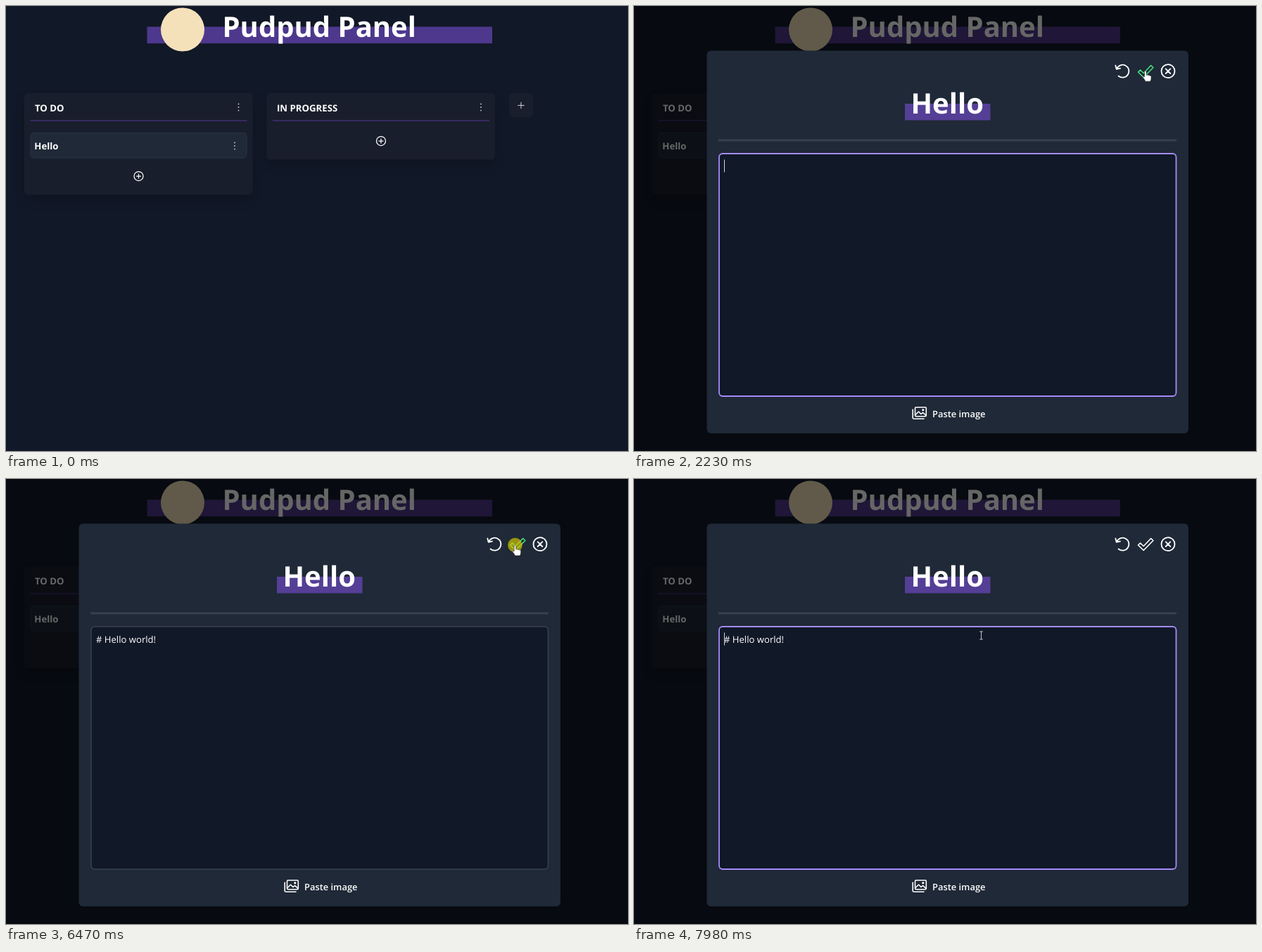
An HTML page for the animation above (8000 ms loop, 884 by 633 pixels).

```html
<!DOCTYPE html>
<html lang="en">
<head>
<meta charset="utf-8">
<title>Task board</title>
<style>
  html, body { margin: 0; width: 100%; height: 100%; overflow: hidden; background: #111827; }
  svg { display: block; width: 884px; height: 633px; }
  text { font-family: "Open Sans", "Noto Sans", sans-serif; fill: #fff; white-space: pre; text-rendering: geometricPrecision; }
  .title { font-weight: 700; font-size: 40px; }
  .head { font-weight: 700; font-size: 13.2px; }
  .paste { font-weight: 600; font-size: 12.9px; }
  .typed { font-weight: 400; font-size: 13.1px; }
  .result { font-weight: 700; font-size: 29.5px; fill: #facc15; }
  .panel { fill: #191e2c; }
  .raised { filter: drop-shadow(0 8px 7px rgba(0, 0, 0, .15)); }
  .rule { fill: #46317f; }
  .icon { fill: none; stroke: currentColor; stroke-linecap: round; stroke-linejoin: round; color: #fff; }
</style>
</head>
<body>
<svg viewBox="0 0 884 633">
  <defs>
    <g id="dots" fill="#cdd1d8">
      <circle cy="-4.6" r=".9"/><circle r=".9"/><circle cy="4.6" r=".9"/>
    </g>
    <g id="add" class="icon" stroke-width="1.25">
      <circle r="6.5"/><path d="M-3 0H3M0-3V3"/>
    </g>
  </defs>

  <rect width="884" height="633" fill="#111827"/>

  <!-- board -->
  <rect x="200.5" y="29.5" width="490.500" height="23.7" fill="#4d388d"/>
  <circle cx="251" cy="33.5" r="31" fill="#f4e1ba"/>
  <text class="title" x="307.5" y="43.5">Pudpud Panel</text>

  <g class="raised">
    <rect class="panel" x="26" y="124" width="324.5" height="144.5" rx="5"/>
    <rect class="panel" x="370.5" y="124" width="324.5" height="94.5" rx="5"/>
  </g>
  <rect class="panel" x="715" y="124" width="34" height="34" rx="5"/>
  <text class="head" x="41" y="150">TO DO</text>
  <text class="head" x="385" y="150">IN PROGRESS</text>
  <rect class="rule" x="34.5" y="162.4" width="308" height="1.3"/>
  <rect class="rule" x="379" y="162.4" width="308" height="1.3"/>
  <rect x="35" y="180.5" width="307" height="35.5" rx="4.5" fill="#1f2937" stroke="#283443"/>
  <text class="head" x="40.3" y="204">Hello</text>
  <use href="#dots" x="330.5" y="144"/>
  <use href="#dots" x="675" y="144"/>
  <use href="#dots" x="325" y="199"/>
  <use href="#add" x="188.5" y="242"/>
  <use href="#add" x="533" y="192"/>
  <path class="icon" stroke-width="1" opacity=".8" d="M727.7 141.4h8.6M732 137.100v8.600"/>

  <!-- dialog -->
  <g id="modal">
    <rect width="884" height="633" opacity=".6"/>
    <rect x="103.5" y="63.5" width="684.5" height="544.5" rx="6" fill="#1f2937"/>
    <rect x="385" y="139" width="121.5" height="23.5" fill="#553f96"/>
    <text class="title" x="393.5" y="152.5">Hello</text>
    <rect x="120" y="189.5" width="651" height="3" fill="#374151"/>

    <g id="close" class="icon" stroke-width="1.8">
      <circle cx="759" cy="92.7" r="9.5"/>
      <path d="M755.7 89.4l6.6 6.6M762.3 89.4l-6.6 6.6"/>
    </g>

    <g id="view">
      <g id="pen" class="icon" stroke-width="1.8">
        <path d="M728 84.3H717.8V101.8H735.3V93"/>
        <path d="M723.3 96.8l.8-4.3 9.2-9.2 3.3 3.3-9.2 9.2zM731 85.8l3.2 3.2" stroke-width="1.5"/>
      </g>
      <rect x="757" y="209" width="14" height="347" fill="#fcfcfc"/>
      <path d="M760 218.2h8l-4-4zM760 546.8h8l-4 4z" fill="#8d8791"/>
      <text id="result" class="result" x="128.5" y="259">Hello world!</text>
    </g>

    <g id="edit">
      <path id="undo" class="icon" stroke-width="1.8" d="M686 89.5A9 9 0 1 1 688.5 99.5M684.3 84.5l1.4 5.3 5.3-1.2"/>
      <path id="check" class="icon" stroke-width="1.6" d="M716.5 94l3-3 4.7 4.5 10.5-11 3.2 3L724.2 101.5z"/>
      <rect id="area" x="121" y="210" width="649.5" height="345" rx="5" fill="#111827"/>
      <text id="typed" class="typed" x="128" y="232.7"></text>
      <rect id="caret" width="1" height="18" fill="#d1d5db"/>
    </g>

    <g class="icon" stroke-width="1.6">
      <rect x="399.5" y="570.8" width="15.8" height="13" rx="1.5"/>
      <path d="M396.2 574v11.5a1.8 1.8 0 0 0 1.8 1.8h14M400 581.5l4.5-4.5 3.5 3.5 2.500-2.200 4.500 4"/>
      <circle cx="410.8" cy="574.6" r=".8"/>
    </g>
    <text class="paste" x="424" y="584.5">Paste image</text>
  </g>

  <!-- pointer -->
  <g id="pointer">
    <circle id="press" r="10.3" fill="#d6c800" opacity=".68"/>
    <path id="arrow" d="M0 0V11.5L2.7 9 4.5 13 6.4 12.2 4.7 8.3H8.3z" fill="#fff" stroke="#111" stroke-width=".7"/>
    <path id="hand" d="M-1.3 1.2Q0-1 1.3 1.2V6q1.5-.8 2.4.4 1.4-.6 2.3.5 2-.4 2.2 1.4V11q0 2-1.3 4H0Q-1.7 11.5-3.6 9.4-3.5 7.6-1.3 8.8z" fill="#fff" stroke="#222" stroke-width=".6"/>
    <path id="beam" d="M-2.3-5.5H2.3M-2.3 5.5H2.3M0-5.5V5.5" fill="none" stroke="#c4c7cc"/>
  </g>
</svg>
<script>
const LOOP = 8000, STEP = 66, BLINK = 530, PRESS = 60;
// moments of the four clicks
const OPEN = 1180, EDIT = 2230, SAVE = 6530, REOPEN = 7780;
const CLICKS = [OPEN, EDIT, SAVE, REOPEN];
const NEWLINE = 5210;

const $ = id => document.getElementById(id);
const show = (id, on) => { $(id).style.display = on ? "" : "none"; };
const within = (t, a, b) => t >= a && t < b;
const clamp = k => Math.max(0, Math.min(1, k));
const smooth = k => k * k * (3 - 2 * k);
// the picture is refreshed in even steps
const snap = t => Math.floor((t + 15) / STEP) * STEP;

const entry = [384, 580];
const moves = [
  { from: 264, to: 760, at: [52, 194] },
  { from: 1450, to: 2100, at: [727, 92] },
  { from: 2240, to: 2500, at: [488.5, 284.5] },
  { from: 5740, to: 6070, at: [762, 93] },
  { from: 6070, to: 6270, at: [723.5, 94] },
  { from: 7120, to: 7390, at: [690, 140] },
  { from: 7390, to: 7660, at: [729, 97.5] },
  { from: REOPEN, to: 7980, at: [493.5, 222.5] }
];
const bursts = [
  { text: "# ", from: 3290, gap: 130 },
  { text: "Hello wor", from: 3560, gap: 98 },
  { text: "ld", from: 4490, gap: 60 },
  { text: "!", from: 4880, gap: 60 }
];
const buttons = [
  { id: "pen", x: 727, mode: "view", color: "#a78bfa" },
  { id: "check", x: 727, mode: "edit", color: "#4ade80" },
  { id: "undo", x: 694, mode: "edit", color: "#facc15" },
  { id: "close", x: 759, color: "#f87171" }
];

const ruler = document.createElement("canvas").getContext("2d");
function textWidth(s) {
  ruler.font = '400 13.1px "Open Sans", "Noto Sans", sans-serif';
  return ruler.measureText(s).width;
}

function pointerAt(t) {
  let [x, y] = entry;
  for (const { from, to, at } of moves) {
    const k = smooth(clamp((t - from) / (to - from)));
    x += (at[0] - x) * k;
    y += (at[1] - y) * k;
  }
  return [x, y];
}

function typing(t) {
  let text = "", last = EDIT;
  for (const b of bursts) {
    if (t < b.from) break;
    const n = Math.min(b.text.length, Math.floor((t - b.from) / b.gap) + 1);
    text += b.text.slice(0, n);
    last = b.from + (n - 1) * b.gap;
  }
  return { text, last };
}

function drawModal(t, mode) {
  show("modal", t >= OPEN);
  $("modal").setAttribute("opacity", clamp(0.01 + (snap(t) - snap(OPEN)) / (2 * STEP)));
  show("view", mode === "view");
  show("edit", mode === "edit");
  show("result", t >= SAVE);
}

function drawNote(t) {
  const again = t >= REOPEN;
  const focus = !within(t, SAVE - PRESS, SAVE);
  const { text, last } = typing(t);
  $("typed").textContent = text;
  $("area").setAttribute("stroke", focus ? "#a78bfa" : "#374151");
  $("area").setAttribute("stroke-width", focus ? 1.8 : 1.5);

  const nextLine = t >= NEWLINE && !again;
  const reset = again ? REOPEN : nextLine ? NEWLINE : last;
  show("caret", focus && Math.floor((t - reset) / BLINK) % 2 === 0);
  $("caret").setAttribute("x", again || nextLine ? 128 : Math.round(128 + textWidth(text)));
  $("caret").setAttribute("y", nextLine ? 238 : 218.5);
}

function drawPointer(t, mode) {
  const [x, y] = pointerAt(snap(t));
  let hover = false;
  for (const b of buttons) {
    const on = t >= OPEN && (!b.mode || b.mode === mode) && Math.hypot(x - b.x, y - 92.5) < 12;
    $(b.id).style.color = on ? b.color : "#fff";
    hover = hover || on;
  }
  const beam = mode === "edit" && y > 209;
  show("pointer", t >= 270);
  show("hand", hover);
  show("beam", beam);
  show("arrow", !hover && !beam);
  show("press", CLICKS.some(c => within(t, c - PRESS, c)));
  $("pointer").setAttribute("transform", `translate(${x} ${y})`);
}

function draw(t) {
  const mode = within(t, EDIT, SAVE) || t >= REOPEN ? "edit" : "view";
  drawModal(t, mode);
  if (mode === "edit") drawNote(t);
  drawPointer(t, mode);
}

const start = performance.now();
function tick() {
  draw((performance.now() - start) % LOOP);
  requestAnimationFrame(tick);
}
tick();
</script>
</body>
</html>
```
